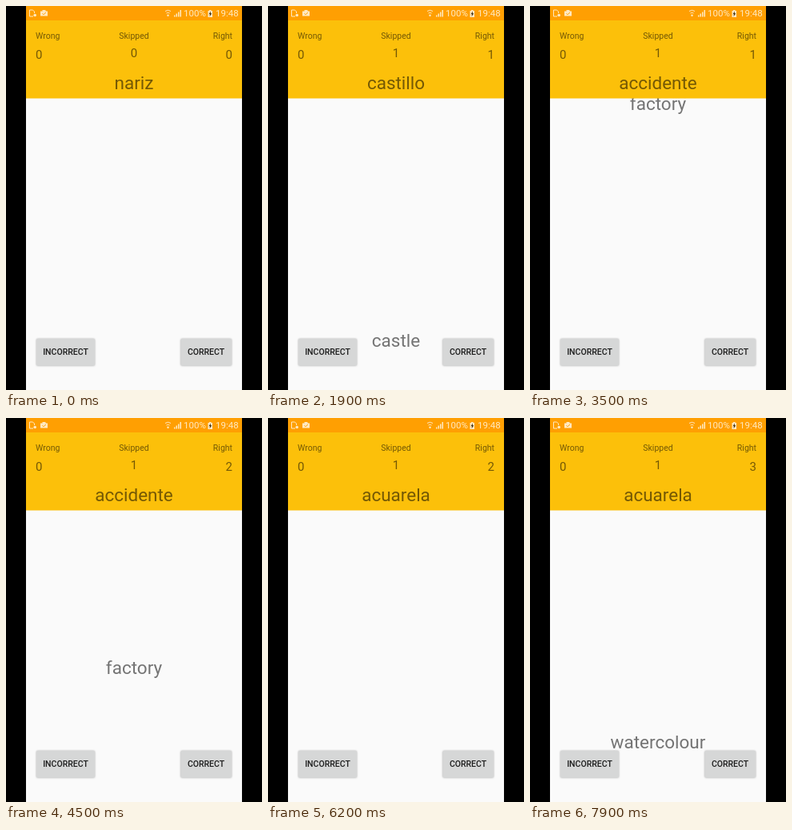
An HTML page for the animation above (8 s loop, 320x480 px).

```html
<!DOCTYPE html>
<html lang="en">
<head>
<meta charset="utf-8">
<title>Falling word quiz</title>
<style>
  html, body { margin: 0; width: 100%; height: 100%; overflow: hidden; background: #000; }
  svg { display: block; width: 320px; height: 480px; font-family: Roboto, Arial, sans-serif; }
  .head { fill: rgba(0, 0, 0, .54); }
  .label { font-size: 10.5px; }
  .count { font-size: 15px; }
  .word { font-size: 22.5px; text-anchor: middle; }
  .mid { text-anchor: middle; }
  .end { text-anchor: end; }
  .button rect { fill: #d6d7d7; }
  .button text { font-size: 10.5px; font-weight: 500; fill: rgba(0, 0, 0, .87); text-anchor: middle; }
  .status { fill: #ffe9c2; font-size: 11.5px; }
</style>
</head>
<body>
<svg viewBox="0 0 320 480">
  <clipPath id="screen"><rect x="25" width="270" height="480"/></clipPath>
  <rect width="320" height="480" fill="#000"/>
  <g clip-path="url(#screen)">
    <rect x="25" width="270" height="480" fill="#fafafa"/>
    <text id="falling" class="word" x="160" fill="#747474"></text>

    <g class="button">
      <rect id="incorrect" x="38" y="416" width="73" height="33.5" rx="1.5"/>
      <text x="74.5" y="436.3">INCORRECT</text>
    </g>
    <g class="button">
      <rect id="correct" x="218.5" y="416" width="63.5" height="33.5" rx="1.5"/>
      <text x="250" y="436.3">CORRECT</text>
    </g>

    <rect x="25" y="18" width="270" height="97.5" fill="#fcc00a"/>
    <rect x="25" width="270" height="18" fill="#ff9f02"/>

    <g class="head">
      <text class="label" x="37" y="41.3">Wrong</text>
      <text class="label mid" x="160" y="41.3">Skipped</text>
      <text class="label end" x="283" y="41.3">Right</text>
      <text class="count" x="37" y="66.3">0</text>
      <text id="skipped" class="count mid" x="160" y="64.3"></text>
      <text id="right" class="count end" x="283" y="66.3"></text>
      <text id="title" class="word" x="160" y="104"></text>
    </g>

    <g class="status">
      <path d="M34 13H29.5V5H33.5L35.5 7V9" fill="none" stroke="#ffe9c2"/>
      <circle cx="36.2" cy="11.5" r="1.8"/>
      <path d="M45.5 6.5V5H49.5V6.5H52V12.5H43V6.5Z"/>
      <path d="M45.5 9.3L47 10.8L49.8 8" fill="none" stroke="#ff9f02"/>
      <path d="M199 6.5Q202.5 4 206 6.5M200.5 9Q202.5 7.5 204.5 9" fill="none" stroke="#ffe9c2"/>
      <circle cx="202.5" cy="11.8" r="1.2"/>
      <path d="M210 13.5V11.5H211.5V13.5ZM212.5 13.5V9.5H214V13.5ZM215 13.5V7.5H216.5V13.5ZM217.5 13.5V5H219V13.5Z"/>
      <text x="222" y="13.3">100%</text>
      <path d="M252.5 6H254V5H256.5V6H258V14H252.5Z"/>
      <path d="M256 6.5L253.5 10.3H255L254.5 13.3L257.2 9.3H255.7Z" fill="#3a2a10"/>
      <text x="262" y="13.3">19:48</text>
    </g>
  </g>
</svg>
<script>
  const LOOP = 8000, STEP = 100;
  const FALL = { first: 75, every: 3025, time: 3100, top: 110, height: 495 };
  const rounds = [
    { title: 'castillo', answer: 'castle' },
    { title: 'accidente', answer: 'factory' },
    { title: 'acuarela', answer: 'watercolour' }
  ];
  const taps = [
    { at: 1300, button: 'correct' },
    { at: 4200, button: 'incorrect' },
    { at: 7300, button: 'correct' }
  ];
  const el = id => document.getElementById(id);

  function setText(id, value) {
    if (el(id).textContent !== String(value)) el(id).textContent = value;
  }

  function drawButton(id, t) {
    const lift = Math.max(0, ...taps
      .filter(tap => tap.button === id)
      .map(tap => 1 - Math.abs(t - tap.at) / 200));
    el(id).style.filter =
      `drop-shadow(0 ${0.8 + 1.4 * lift}px ${0.8 + 1.4 * lift}px rgba(0,0,0,.32))`;
  }

  function draw(t) {
    const index = Math.floor((t - FALL.first) / FALL.every);
    const round = rounds[index];
    setText('title', round ? round.title : 'nariz');
    setText('falling', round ? round.answer : '');
    setText('skipped', round ? 1 : 0);
    setText('right', taps.filter(tap => t >= tap.at).length);

    // Slow start, fastest at half way, slow end.
    const p = (t - FALL.first - index * FALL.every) / FALL.time;
    const y = FALL.top + FALL.height * (1 - Math.cos(Math.PI * p)) / 2;
    el('falling').setAttribute('y', y.toFixed(2));

    drawButton('correct', t);
    drawButton('incorrect', t);
  }

  let start;
  function tick(now) {
    start ??= now;
    const t = (now - start + 2) % LOOP;
    draw(Math.floor(t / STEP) * STEP);
    requestAnimationFrame(tick);
  }
  draw(0);
  requestAnimationFrame(tick);
</script>
</body>
</html>
```
